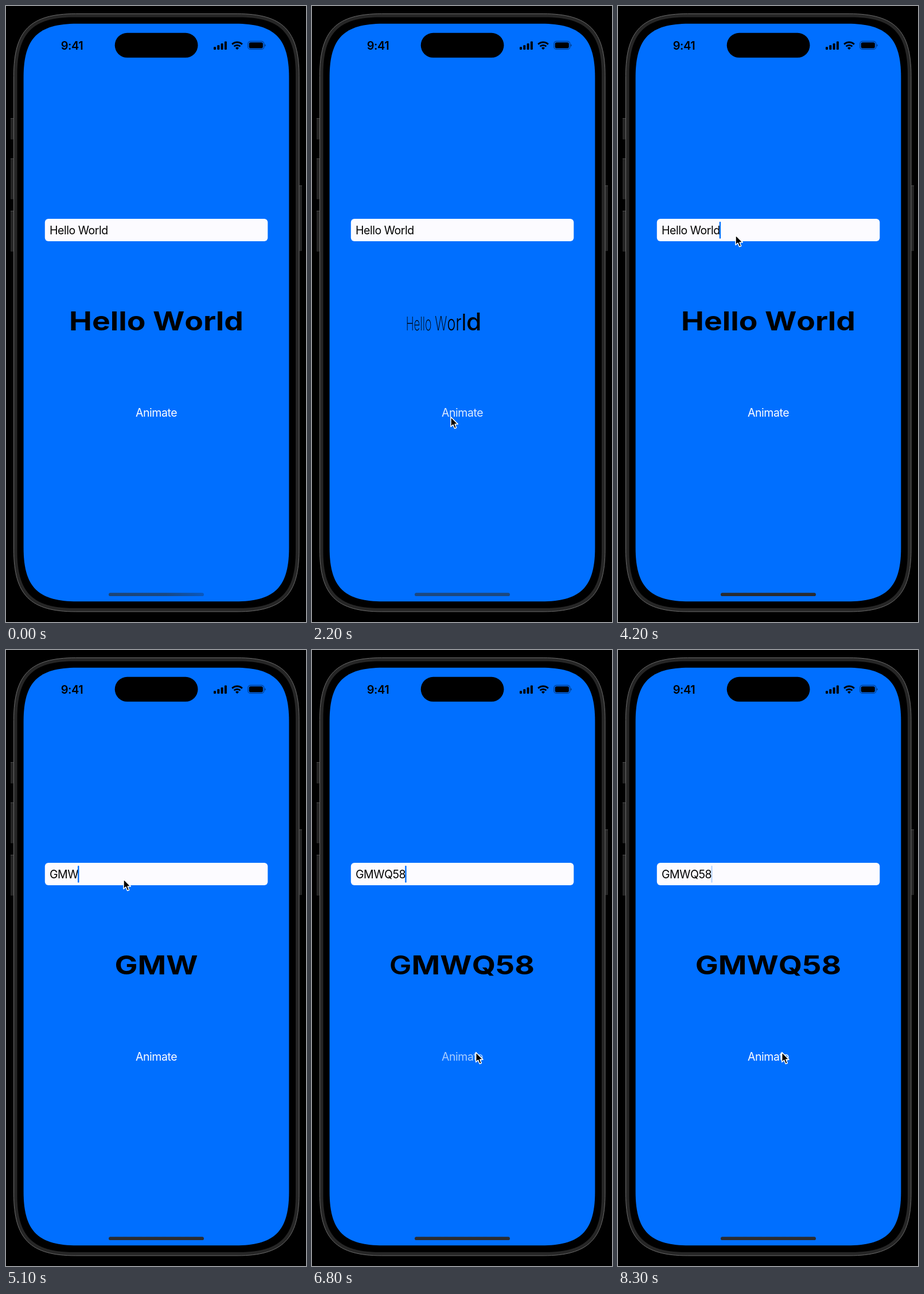
Recreate the animation shown at these times as an HTML page. Size 523x1071 px, loop 8400 ms.

```html
<!DOCTYPE html>
<html lang="en">
<head>
<meta charset="utf-8">
<title>Animated type</title>
<style>
  html, body { margin: 0; width: 100%; height: 100%; overflow: hidden; background: #000; }
  svg { display: block; width: 100%; height: 100%; }
  text { font-family: Inter, "Liberation Sans", sans-serif; white-space: pre; }
  .ui { font-size: 19.5px; letter-spacing: -0.45px; }
  .clock { font-size: 20px; font-weight: 600; letter-spacing: -0.4px; }
</style>
</head>
<body>
<svg viewBox="0 0 523 1071">
  <defs>
    <linearGradient id="bar">
      <stop offset="0"/>
      <stop offset="0.6"/>
      <stop offset="1"/>
    </linearGradient>
  </defs>
  <rect width="523" height="1071"/>

  <g id="buttons"></g>
  <path id="frame" fill="#262626" stroke="#6c6c6c"/>
  <path id="bezel"/>
  <path id="screen" fill="#006fff"/>

  <text class="clock" x="115" y="76" text-anchor="middle">9:41</text>
  <rect x="189.7" y="46.8" width="144.8" height="43" rx="21.5"/>
  <g id="signal"></g>
  <g fill="none" stroke="#000" stroke-width="2.9">
    <path d="M394.2 66.6a12.6 12.6 0 0 1 17.6 0"/>
    <path d="M397.6 70.3a7.8 7.8 0 0 1 10.8 0"/>
  </g>
  <path d="M403 76l-3-3.1a4.3 4.3 0 0 1 6 0z"/>
  <g opacity="0.45">
    <rect x="421.8" y="61.4" width="28" height="14" rx="4.4" fill="none" stroke="#000" stroke-width="1.2"/>
    <path d="M451 66.3q1.7.6 1.7 2.2t-1.7 2.2z"/>
  </g>
  <rect x="423.7" y="63.3" width="24.2" height="10.2" rx="2.8"/>

  <rect x="67.8" y="370" width="388.5" height="39" rx="6" fill="#fcfbff"/>
  <text id="field" class="ui" x="76" y="397"></text>
  <rect id="caret" y="375" width="2.4" height="29.5" rx="1.2" fill="#006fff"/>

  <g id="title"></g>
  <text id="button" class="ui" x="262" y="714" fill="#fff" text-anchor="middle">Animate</text>
  <rect x="179" y="1020.2" width="166" height="5.9" rx="2.95" fill="url(#bar)"/>
  <path id="pointer" d="M0 0V17L3.9 13.5 6.6 20 9.7 18.7 7.1 12.4H12.3Z"
        stroke="#fff" stroke-width="1.5" stroke-linejoin="round"/>
</svg>
<script>
const LOOP = 8400, STEP = 100;
const FIRST = 'Hello World', SECOND = 'GMWQ58';
const CENTER = 262, BASELINE = 564;
const FOCUS = 3600;
const ERASE = 4300, ERASE_GAP = 35;
const KEYS = [4750, 4900, 5050, 5300, 5500, 5700];
const LAST_KEY = KEYS[KEYS.length - 1];

// Per-letter wave: shrink and grow back, one letter after another.
const WAVES = [1750, 6795];
const SPAN = 410, DELAY = 41, LAYOUT_LAG = 140;
const WIDE = { size: 45.4, stretch: 1.175, weight: 660 };
const THIN = { size: 33, stretch: 0.57, weight: 200 };

const PRESSES = [1720, 6700];
const MOVES = [
  { start: 900, end: 1500, from: [286, 1074], to: [242, 714.5] },
  { start: 2660, end: 3500, from: [242, 714.5], to: [205, 398.5] },
  { start: 5900, end: 6550, from: [205, 398.5], to: [285.7, 699.5] }
];

const $ = id => document.getElementById(id);
const clamp = x => Math.min(1, Math.max(0, x));
const mix = (a, b, k) => a + (b - a) * k;
const ramp = (t, a, b) => clamp((t - a) / (b - a));
const smooth = x => x * x * (3 - 2 * x);
const pen = document.createElement('canvas').getContext('2d');

function add(parent, tag, attrs) {
  const node = document.createElementNS('http://www.w3.org/2000/svg', tag);
  for (const key in attrs) node.setAttribute(key, attrs[key]);
  parent.appendChild(node);
  return node;
}

// Rounded rectangle with continuous corners.
function squircle(x, y, w, h, r) {
  const e = 1.3 * r, c = 0.348 * r, R = x + w, B = y + h;
  return `M${x + e} ${y}H${R - e}C${R - c} ${y} ${R} ${y + c} ${R} ${y + e}` +
    `V${B - e}C${R} ${B - c} ${R - c} ${B} ${R - e} ${B}` +
    `H${x + e}C${x + c} ${B} ${x} ${B - c} ${x} ${B - e}` +
    `V${y + e}C${x} ${y + c} ${x + c} ${y} ${x + e} ${y}Z`;
}

function buildPhone() {
  $('frame').setAttribute('d', squircle(13.5, 13.5, 497.5, 1039.5, 83));
  $('bezel').setAttribute('d', squircle(19.5, 19.5, 485.5, 1027.5, 77));
  $('screen').setAttribute('d', squircle(30.6, 30.7, 462.8, 1004.6, 72));
  [[8, 195, 37], [8, 265, 71], [8, 356, 71], [511, 312, 114]].forEach(([x, y, height]) => {
    add($('buttons'), 'rect', { x, y, width: 5, height, rx: 1, fill: '#252525' });
    add($('buttons'), 'rect', { x, y, width: 5, height: 1, fill: '#4a4a4a' });
  });
  [5, 8, 11, 14.5].forEach((height, i) =>
    add($('signal'), 'rect', { x: 362 + i * 6.3, y: 76 - height, width: 4, height, rx: 1.2 }));
}

function typedText(t) {
  if (t < ERASE) return FIRST;
  if (t < KEYS[0]) {
    const gone = 1 + Math.floor((t - ERASE) / ERASE_GAP);
    return FIRST.slice(0, Math.max(0, FIRST.length - gone));
  }
  return SECOND.slice(0, KEYS.filter(key => key <= t).length);
}

function thinness(t, i) {
  const start = WAVES.find(w => t >= w && t < w + 2 * SPAN + 10 * DELAY);
  if (start === undefined) return 0;
  const x = (t - start - i * DELAY) / SPAN;
  return x <= 0 || x >= 2 ? 0 : 1 - Math.abs(1 - x) ** 3;
}

function layout(text, t) {
  let width = 0;
  const letters = [...text].map((char, i) => {
    const k = thinness(t, i);
    const size = mix(WIDE.size, THIN.size, k);
    const stretch = mix(WIDE.stretch, THIN.stretch, k);
    const weight = Math.round(mix(WIDE.weight, THIN.weight, k));
    pen.font = `${weight} 100px Inter, "Liberation Sans", sans-serif`;
    const x = width;
    width += pen.measureText(char).width * size / 100 * stretch;
    return { char, x, size, stretch, weight };
  });
  return { letters, width };
}

const glyphs = [...FIRST].map(() => add($('title'), 'text', {}));

// The centred box grows at once but gives up space a little late.
function drawTitle(text, t) {
  const { letters, width } = layout(text, t);
  const left = CENTER - Math.max(width, layout(text, t - LAYOUT_LAG).width) / 2;
  glyphs.forEach((node, i) => {
    const g = letters[i];
    node.textContent = g ? g.char : '';
    if (!g) return;
    node.setAttribute('font-size', g.size);
    node.setAttribute('font-weight', g.weight);
    node.setAttribute('transform', `translate(${left + g.x} ${BASELINE}) scale(${g.stretch} 1)`);
  });
}

function caretAlpha(t) {
  if (t < FOCUS) return 0;
  if (t < LAST_KEY) return 1;
  const phase = (t - LAST_KEY) % 1000;
  return phase < 850 ? 1 - ramp(phase, 470, 645) : ramp(phase, 850, 1000);
}

function drawField(text, t) {
  $('field').textContent = text;
  const end = text ? $('field').getComputedTextLength() : 0;
  $('caret').setAttribute('x', 75 + end);
  $('caret').setAttribute('opacity', caretAlpha(t));
}

function drawButton(t) {
  const dim = PRESSES.reduce((sum, p) =>
    sum + ramp(t, p, p + 80) * (1 - ramp(t, p + 180, p + 660)), 0);
  $('button').setAttribute('opacity', 1 - 0.34 * dim);
}

// The sideways part starts slower, which bends the path.
function drawPointer(t) {
  const move = MOVES.filter(m => t >= m.start).pop();
  $('pointer').setAttribute('visibility', move ? 'visible' : 'hidden');
  if (!move) return;
  const k = smooth(ramp(t, move.start, move.end));
  const x = mix(move.from[0], move.to[0], k ** 1.4);
  const y = mix(move.from[1], move.to[1], k);
  $('pointer').setAttribute('transform', `translate(${x} ${y})`);
}

function drawBar(t) {
  const settle = ramp(t, 0, 300), dark = ramp(t, FOCUS - 200, FOCUS + 100);
  const blend = (a, b, k) => a.map((v, i) => mix(v, b[i], k));
  const calm = [28, 72, 128], gray = [42, 44, 50];
  const stops = [[30, 68, 116], [26, 72, 130], [10, 88, 190]];
  $('bar').querySelectorAll('stop').forEach((stop, i) => {
    const color = blend(blend(stops[i], calm, settle), gray, dark).map(Math.round);
    stop.setAttribute('stop-color', `rgb(${color})`);
  });
}

function draw(now) {
  const t = Math.floor((now % LOOP) / STEP) * STEP;
  const text = typedText(t);
  drawTitle(text, t);
  drawField(text, t);
  drawButton(t);
  drawPointer(t);
  drawBar(t);
}

buildPhone();
let origin;
function tick(now) {
  origin ??= now;
  draw(Math.max(0, now - origin));
  requestAnimationFrame(tick);
}
draw(0);
requestAnimationFrame(tick);
</script>
</body>
</html>
```
